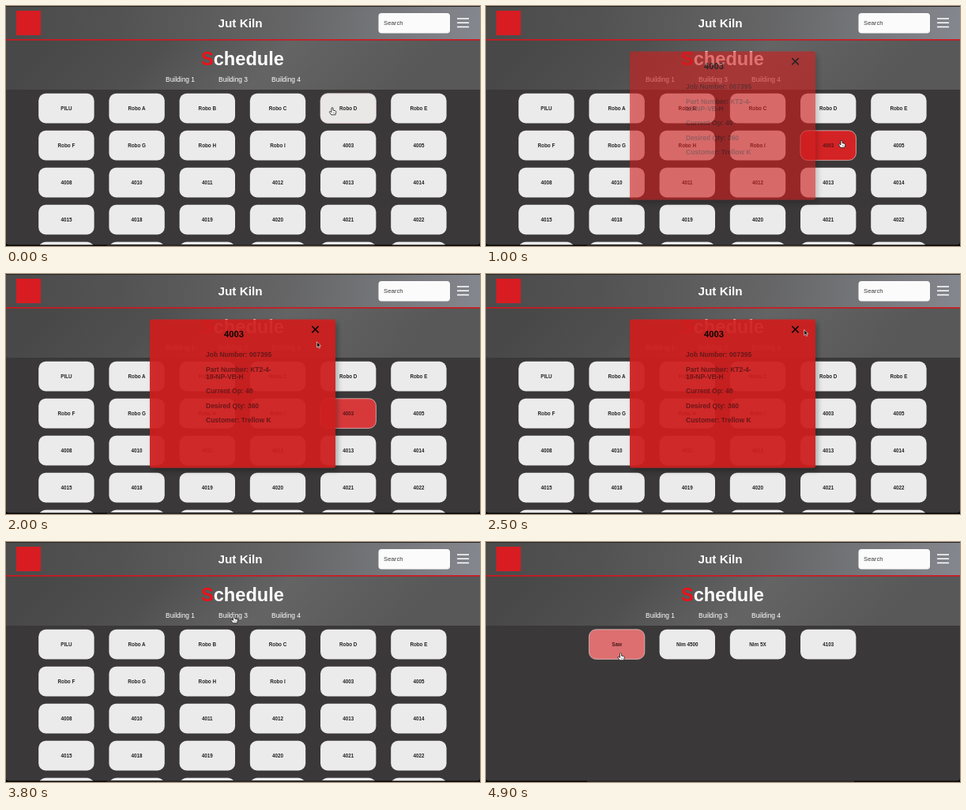
Animation of 600x304 px, one loop 5000 ms. Source, as an HTML page:

```html
<!DOCTYPE html>
<html lang="en">
<head>
<meta charset="utf-8">
<title>Schedule</title>
<style>
  html, body { margin: 0; width: 100%; height: 100%; overflow: hidden; background: #3a3839; }
  svg { display: block; width: 600px; height: 304px; }
  text { font-family: "Liberation Sans", Arial, sans-serif; }
  .bold { font-weight: bold; }
  .mid { text-anchor: middle; }
</style>
</head>
<body>
<svg id="stage" viewBox="0 0 600 304" xmlns="http://www.w3.org/2000/svg">
  <defs>
    <linearGradient id="bar" gradientUnits="userSpaceOnUse" x1="0" y1="0" x2="590" y2="60">
      <stop offset="0" stop-color="#4b4b4b"/>
      <stop offset=".25" stop-color="#535353"/>
      <stop offset=".6" stop-color="#656566"/>
      <stop offset="1" stop-color="#84868d"/>
    </linearGradient>
    <linearGradient id="steel" gradientUnits="userSpaceOnUse" x1="150" y1="-60" x2="420" y2="190">
      <stop offset="0" stop-color="#484848"/>
      <stop offset=".3" stop-color="#505050"/>
      <stop offset=".62" stop-color="#646464"/>
      <stop offset="1" stop-color="#585858"/>
    </linearGradient>
    <filter id="shade" x="-10%" y="-10%" width="120%" height="125%">
      <feDropShadow dx="3" dy="4" stdDeviation="3" flood-color="#000" flood-opacity=".3"/>
    </filter>
  </defs>

  <rect width="600" height="304" fill="#3a3839"/>
  <rect width="600" height="106" fill="url(#steel)"/>
  <rect width="600" height="42" fill="url(#bar)"/>
  <rect width="600" height="1" fill="#262626"/>
  <rect y="42" width="600" height="1.6" fill="#d2171d"/>
  <rect x="13" y="6" width="31" height="31" fill="#d81c22"/>
  <text class="bold mid" x="296.5" y="27" font-size="15.3" fill="#fff">Jut Kiln</text>
  <rect x="471.5" y="9" width="90.5" height="25.5" rx="4" fill="#fbfbfb"/>
  <text x="478" y="23.6" font-size="7.8" fill="#3c3c3c">Search</text>
  <path d="M571 16h15M571 21.3h15M571 26.6h15" stroke="#fff" stroke-width="1.5"/>
  <text class="bold" x="247" y="75.3" font-size="23.6" fill="#fff"><tspan fill="#f01016">S</tspan>chedule</text>
  <g id="nav" font-size="8.45" fill="#fff"></g>

  <g id="first"></g>
  <g id="second"></g>
  <path d="M0 299Q0 302.5 4 302.5H596Q600 302.5 600 299V304H0Z" fill="#050505"/>
  <rect x="128" y="302" width="338" height="2" fill="#2b2a2b"/>

  <g id="modal">
    <rect x="182" y="57.5" width="235" height="188" rx="3" fill="#d01f20" fill-opacity=".92" filter="url(#shade)"/>
    <text class="bold mid" x="288.5" y="80" font-size="11.2" fill="#0c0505">4003</text>
    <path d="M387.3 66l8.4 8.4M395.7 66l-8.4 8.4" stroke="#0c0505" stroke-width="1.6"/>
    <g id="details" class="bold" font-size="8.5" fill="#6b1719"></g>
  </g>

  <g id="hand">
    <path d="M-1 .7Q0-.5 1 .7V3.6L4.2 4.4Q5 4.8 4.8 6L4 9.3H-1.3L-3.6 5.8Q-3.4 4.5-2.3 5L-1 6Z"
      fill="#fff" stroke="#151515" stroke-width=".8" stroke-linejoin="round"/>
    <path d="M1.2 6v1.8M2.7 6.2v1.6" stroke="#333" stroke-width=".5"/>
  </g>
  <path id="arrow" d="M0 0V7.2L1.7 5.7L2.8 8.3L4 7.8L2.9 5.3H5.1Z"
    fill="#0a0a0a" stroke="#fff" stroke-width=".6" stroke-linejoin="round"/>
</svg>
<script>
const LOOP = 5000, STEP = 100, MOVE = 600, HOVER = 450, FADE = 300;
const NS = "http://www.w3.org/2000/svg";
const el = id => document.getElementById(id);

function add(parent, tag, attrs, label) {
  const node = document.createElementNS(NS, tag);
  for (const k in attrs) node.setAttribute(k, attrs[k]);
  if (label) node.textContent = label;
  return parent.appendChild(node);
}

function card(parent, label, col, row) {
  const x = 41.2 + 89.2 * col, y = 110.8 + 47 * row;
  const box = add(parent, "rect", { x, y, width: 70.4, height: 37.6, rx: 9, fill: "#ebebeb", "stroke-width": .7 });
  const text = add(parent, "text", {
    x: x + 35.2, y: y + 21.2, class: "bold mid", "font-size": 6.3, fill: "#222"
  }, label);
  return { box, text };
}

["Building 1", "Building 3", "Building 4"].forEach((name, i) =>
  add(el("nav"), "text", { x: 202 + 67 * i, y: 96.3 }, name));

const machines = ("PILU,Robo A,Robo B,Robo C,Robo D,Robo E,Robo F,Robo G,Robo H,Robo I,4003,4005," +
  "4008,4010,4011,4012,4013,4014,4015,4018,4019,4020,4021,4022,,,,,,").split(",");
const grid = machines.map((name, i) => card(el("first"), name, i % 6, Math.floor(i / 6)));
const saws = ["Saw", "Nim 4500", "Nim 5X", "4103"].map((name, i) => card(el("second"), name, i + 1, 0));

// "|" wraps a line inside a paragraph
let lineY = 105;
for (const paragraph of ["Job Number: 007395", "Part Number: KT2-4-|18-NP-VB-H",
  "Current Op: 40", "Desired Qty: 360", "Customer: Trellow K"]) {
  for (const line of paragraph.split("|")) {
    add(el("details"), "text", { x: 253, y: lineY }, line);
    lineY += 9.2;
  }
  lineY += 9.3;
}

const mix = (a, b, p) => a + (b - a) * p;
const ramp = (t, start, span) => Math.min(1, Math.max(0, (t - start) / span));
const pulse = (t, on, off, span) => ramp(t, on, span) - ramp(t, off, span);
const smooth = p => p * p * (3 - 2 * p);
const blend = (from, to, p) => `rgb(${from.map((v, i) => Math.round(mix(v, to[i], p)))})`;

// Each glide starts at the given time and lasts MOVE
const glides = [
  { at: 0, x: 450, y: 170 },
  { at: 1000, x: 392.7, y: 87 },
  { at: 1900, x: 402.7, y: 70.5 },
  { at: 2500, x: 375, y: 72 },
  { at: 3100, x: 288.5, y: 93.5 },
  { at: 4300, x: 170.5, y: 140.5 }
];

function pointer(t) {
  return glides.reduce((pos, g) => {
    const p = smooth(ramp(t, g.at, MOVE));
    return { x: mix(pos.x, g.x, p), y: mix(pos.y, g.y, p) };
  }, { x: 413, y: 128.5 });
}

function tint({ box, text }, p) {
  box.setAttribute("fill", blend([235, 235, 235], [212, 35, 37], p));
  box.setAttribute("stroke", p > 0 ? "#e6d2d0" : "none");
  text.setAttribute("fill", blend([34, 34, 34], [95, 20, 22], p));
}

const show = (node, on) => node.setAttribute("display", on ? "inline" : "none");

function render(t) {
  const next = t >= 4000;
  show(el("first"), !next);
  show(el("second"), next);
  tint(grid[4], pulse(t, -10, 400, HOVER));
  tint(grid[10], pulse(t, 450, 1950, HOVER));
  tint(saws[0], pulse(t, 4620, LOOP, HOVER));

  const fade = pulse(t, 800, 2600, FADE);
  show(el("modal"), fade > 0);
  el("modal").setAttribute("opacity", fade);

  const { x, y } = pointer(t);
  const overCard = t < 1300 || t >= 4600;
  const overLink = t >= 3500 && t < 4400;
  const hand = overCard || overLink;
  show(el("hand"), hand);
  show(el("arrow"), !hand);
  el(hand ? "hand" : "arrow").setAttribute("transform", `translate(${x} ${y})`);
}

function tick() {
  const t = performance.now() % LOOP;
  render(Math.floor(t / STEP) * STEP);
  requestAnimationFrame(tick);
}
tick();
</script>
</body>
</html>
```
